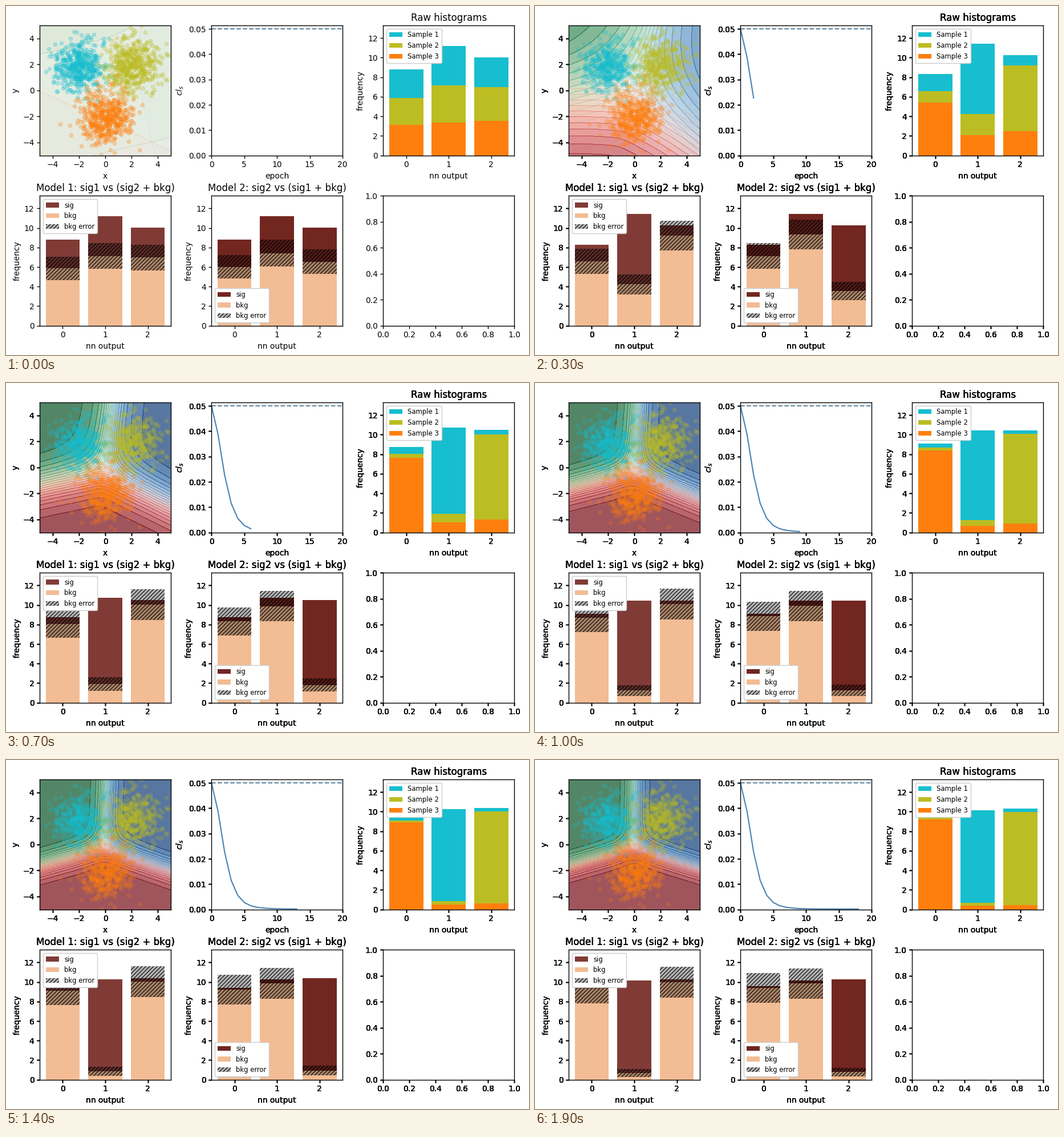
A matplotlib script that plays this animation: 917 px wide and 611 px high, repeating every 2 s.

```python
import numpy as np
import matplotlib.pyplot as plt
from matplotlib.animation import FuncAnimation
from matplotlib.artist import Artist
from matplotlib.patches import Patch

W, H, DPI = 917, 611, 100
FRAMES, INTERVAL = 20, 100

plt.rcParams.update({"font.family": "DejaVu Sans", "font.size": 10,
                     "axes.linewidth": 1, "xtick.major.width": 1,
                     "ytick.major.width": 1, "hatch.linewidth": 0.8})

CYAN, OLIVE, ORANGE = "#17becf", "#bcbd22", "#ff7f0e"
PEACH, SIG1, SIG2 = "#f2bc94", "#803b36", "#722620"
ERROR = dict(fc=(0, 0, 0, 0.3), hatch="/////")
BINS = np.arange(3)


def learned(n, start, gain, tau, power=1.12):
    """A quantity that training moves from start to start + gain."""
    return start + gain * (1 - np.exp(-(n / tau) ** power))


def softmax(logits):
    e = np.exp(logits)
    return e / e.sum(axis=0)


# Each sample settles in its own bin; the other two bins lose by log-odds.
def yields(n):
    s1 = softmax([-learned(n, 0.34, 3.70, 7.7), 0, -learned(n, 0.30, 3.05, 3.8)])
    s2 = softmax([-learned(n, 0.23, 3.85, 5.6), -learned(n, -0.09, 3.65, 6.6), 0])
    s3 = softmax([0, -learned(n, -0.07, 3.50, 7.8), -learned(n, -0.12, 3.50, 9.0)])
    return 10 * s1, 10 * s2, 10 * s3


EPOCHS = np.arange(FRAMES)
CLS = 0.05 * np.exp(-learned(EPOCHS, 0, 5.8, 6.2, 1.7))

# Network output over the plane
grid = np.linspace(-5, 5, 101)
X, Y = np.meshgrid(grid, grid)
LEVELS = np.linspace(0, 1, 21)
MIDS = (LEVELS[1:] + LEVELS[:-1]) / 2
CMAPS = [plt.get_cmap(name) for name in ("Greens", "Reds", "Blues")]


def outputs(n):
    tilt = 0.5 * np.exp(-n / 5)
    u = X * np.cos(tilt) - Y * np.sin(tilt)
    v = X * np.sin(tilt) + Y * np.cos(tilt)
    side = learned(n, 0.02, 1.6, 8, 1.3) * (0.45 * u + 0.55 * np.tanh(u))
    down = learned(n, 0.03, 2.5, 10, 1.4) * (0.1 - v)
    bias = 0.4 * np.exp(-1.5 * n)
    return softmax([bias - side, down, side])


def tint(cmap, p, alpha):
    colors = cmap(p)
    colors[:, 3] = alpha
    return colors


# Layout
fig, axs = plt.subplots(2, 3, figsize=(W / DPI, H / DPI), dpi=DPI)
AX_W, AX_H = 229.7, 227.6
for (r, c), ax in np.ndenumerate(axs):
    left, top = 59.2 + 301.1 * c, 34 + 298.1 * r
    ax.set_position([left / W, 1 - (top + AX_H) / H, AX_W / W, AX_H / H])
plane, curve, raw, model1, model2, spare = axs.flat

plane.set(xlim=(-5, 5), ylim=(-5, 5), xlabel="x", ylabel="y",
          xticks=range(-4, 5, 2), yticks=range(-4, 5, 2))
curve.set(xlim=(0, 20), ylim=(0, 0.0514), xlabel="epoch", ylabel="$cl_s$",
          xticks=range(0, 21, 5), yticks=np.arange(6) / 100)
for ax, title in ((raw, "Raw histograms"),
                  (model1, "Model 1: sig1 vs (sig2 + bkg)"),
                  (model2, "Model 2: sig2 vs (sig1 + bkg)")):
    ax.set(xlim=(-0.54, 2.54), ylim=(0, 13.3), xticks=BINS,
           yticks=range(0, 13, 2), xlabel="nn output", ylabel="frequency",
           title=title)


def add_legend(ax, loc, entries):
    handles = [Patch(label=label, **style) for label, style in entries]
    ax.legend(handles=handles, loc=loc, fontsize="small", framealpha=1)


add_legend(raw, "upper left", [("Sample 1", dict(fc=CYAN)),
                               ("Sample 2", dict(fc=OLIVE)),
                               ("Sample 3", dict(fc=ORANGE))])
for ax, loc, color in ((model1, "upper left", SIG1), (model2, "lower left", SIG2)):
    add_legend(ax, loc, [("sig", dict(fc=color)), ("bkg", dict(fc=PEACH)),
                         ("bkg error", ERROR)])

rng = np.random.default_rng(7)
clouds = []
for center, color in (((-2, 2), CYAN), ((2, 2), OLIVE), ((0, -2), ORANGE)):
    pts = rng.normal(center, 1, (500, 2))
    clouds.append(plane.scatter(*pts.T, s=20, lw=1, color=color, zorder=2))

curve.axhline(0.05, color="#6488a2", ls="--", lw=1.5)
line, = curve.plot([], [], color="steelblue", lw=1.5)


class Overdraw(Artist):
    """Repeats axis text so that its soft edges grow darker."""
    zorder = 10
    times = 0

    def draw(self, renderer):
        for _ in range(self.times):
            for ax in axs.flat:
                for part in (ax.xaxis, ax.yaxis, ax.title):
                    part.draw(renderer)


overdraw = fig.add_artist(Overdraw())
moving = []


def draw_plane(n):
    inner = LEVELS[1:-1]
    for cmap, p in zip(CMAPS, outputs(n)):
        fills = tint(cmap, MIDS, 0.7 * MIDS ** 1.5)
        edges = tint(cmap, np.minimum(1, inner + 0.25), 0.04 + 0.4 * inner ** 1.5)
        moving.append(plane.contourf(X, Y, p, LEVELS, colors=fills, zorder=1))
        moving.append(plane.contour(X, Y, p, inner, colors=edges,
                                    linewidths=0.6, zorder=1.1))


def stack(ax, layers):
    base = np.zeros(3)
    for height, color in layers:
        moving.append(ax.bar(BINS, height, bottom=base, color=color))
        base = base + height


def draw_model(ax, sig, bkg, color):
    stack(ax, [(bkg, PEACH), (sig, color)])
    err = 0.497 * np.sqrt(bkg)
    moving.append(ax.bar(BINS, 2 * err, bottom=bkg - err, **ERROR))


def update(n):
    while moving:
        moving.pop().remove()
    s1, s2, s3 = yields(n)
    draw_plane(n)
    stack(raw, [(s3, ORANGE), (s2, OLIVE), (s1, CYAN)])
    draw_model(model1, s1, s2 + s3, SIG1)
    draw_model(model2, s2, s1 + s3, SIG2)
    for cloud in clouds:
        cloud.set_alpha(0.2 + 0.07 * np.exp(-n / 3))
    line.set_data(EPOCHS[:n], CLS[:n])
    overdraw.times = min(n, 3)
    return []


anim = FuncAnimation(fig, update, frames=FRAMES, init_func=lambda: update(0),
                     interval=INTERVAL, repeat=True, repeat_delay=0, blit=False)
plt.show()
```
